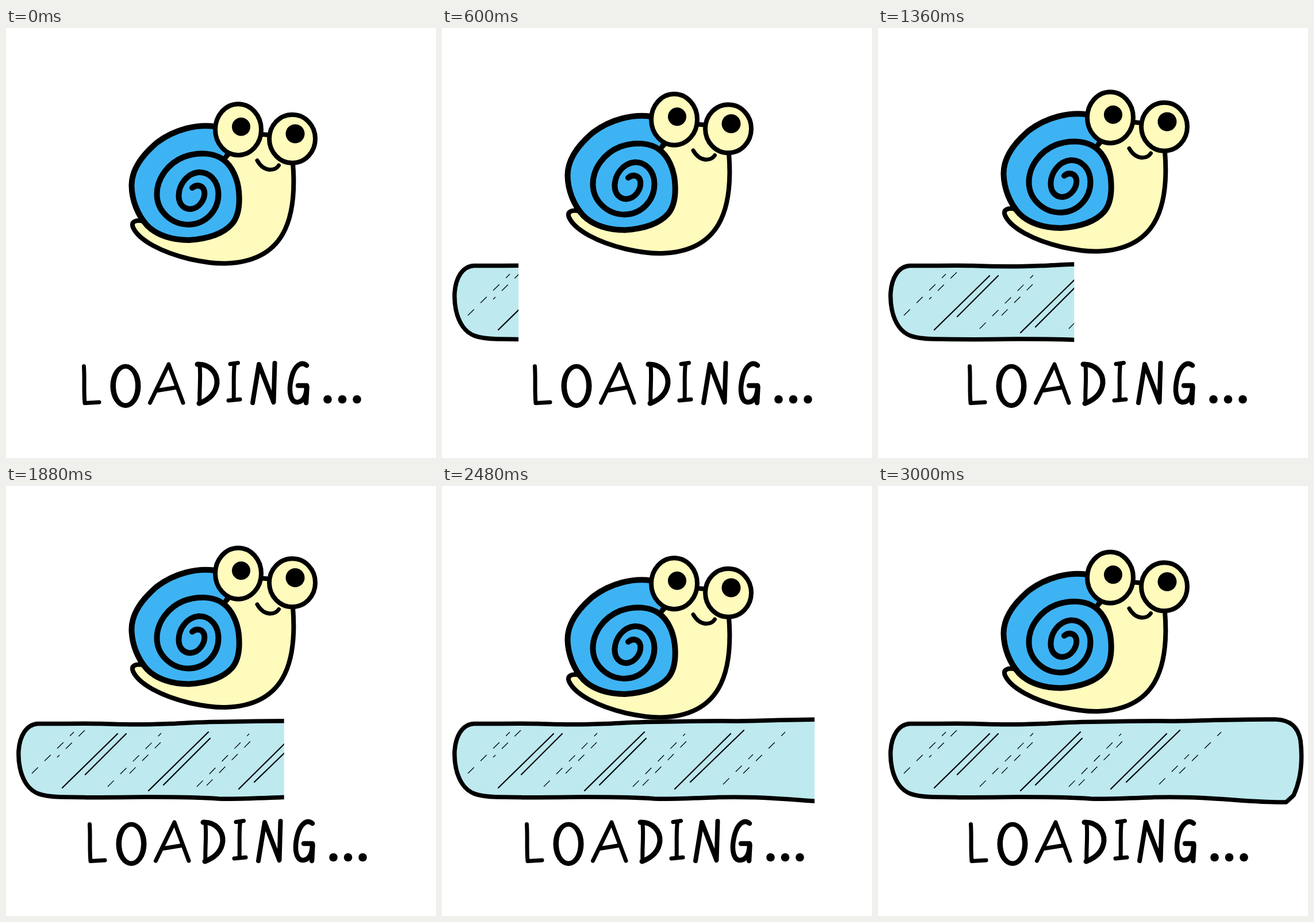
Animation, 748 px wide and 748 px high, one loop 3.04 s. Source, as an HTML page without scripts:

```html
<!DOCTYPE html>
<html lang="en">
<head>
<meta charset="utf-8">
<title>Loading</title>
<style>
  @property --n { syntax: "<number>"; inherits: true; initial-value: 0; }

  html, body { margin: 0; width: 100%; height: 100%; overflow: hidden; background: #fff; }

  svg {
    display: block; width: 100%; height: 100%;
    fill: none; stroke: #000; stroke-linecap: round; stroke-linejoin: round;
    animation: tick 3040ms steps(76) infinite;
  }
  /* --n counts 40 ms ticks */
  @keyframes tick { from { --n: 0; } to { --n: 76; } }

  /* acos(cos(x)) is a triangle wave; tan of a tiny angle makes it a plain number */
  .snail { transform: translateY(calc(tan(acos(cos(var(--n) * 18deg)) / 100) * -1113.7px)); }
  .word { transform: translateX(calc(tan(acos(cos(var(--n) * 132deg)) / 100) * 954.6px - 4px * min(1, var(--n)))); }
  .cover { transform: translateX(calc(10.957px * var(--n) - 31.3px)); fill: #fff; stroke: none; }

  .bar { fill: #bde9ef; stroke-width: 7.5; }
  .shine { stroke-width: 2.2; }
  .dash { stroke-width: 1.3; stroke-dasharray: 15 16; stroke-linecap: butt; }
  .cream { fill: #fffbbd; stroke-width: 8; }
  .blue { fill: #3eb3f3; stroke: none; }
  .shell { stroke-width: 10; }
  .ink { fill: #000; stroke: none; }
</style>
</head>
<body>
<svg viewBox="0 0 748 748" role="img" aria-label="LOADING...">
  <g>
    <path class="bar" d="M55 413.5C90 414 130 412.5 165 413.5C205 415 250 415 285 413.5C320 412 350 410 390 410C440 409 470 408.5 510 409C570 408 630 405.5 692 406C717 407 731 419 735 443C739 478 735 512 723 538L710 550C670 551 625 546 580 543.5C545 541 510 541 480 541.5C440 543 400 545 370 544C330 541 290 541 240 541C190 542 140 542 95 541C62 540 47 535 36 519C24 502 21 478 22 460C24 435 35 415 55 413.5Z"/>
    <path class="shine" d="M98 525L194 431M138 502L209 431M248 530L352 428M274 520L355 439M405 527L502 431M432 515L525 425"/>
    <path class="dash" d="M45 500L118 428M104 457L137 425M89 472L93 468M177 523L270 430M215 500L269 446M332 523L423 431M349 521L436 433M489 519L541 467M524 500L597 428"/>
  </g>
  <rect class="cover" y="390" width="800" height="175"/>

  <g class="snail">
    <path class="cream" d="M240 336C225 333 217 337 221 347C231 369 270 390 320 402C345 407.5 365 410 382 409.5C430 408 463 390 481 359C499 328 503 285 499 235L497 205L456 186L446 185L400 205L380 228Z"/>
    <path class="blue" d="M364 171.5C332 167 294 176 263 199C232 225 218 250 218.5 275C219 300 229 325 245 343C262 361 290 369 318 369C350 367 378 358 393 341C405 327 407 305 405 284C403 262 393 240 378 229L388 214Z"/>
    <path class="shell" d="M364 171.5C332 167 294 176 263 199C232 225 218 250 218.5 275C219 300 229 325 245 343C262 361 290 369 318 369C350 367 378 358 393 341C405 327 407 305 405 284C403 262 393 240 378 229C362 217 335 215 310 224C282 235 262 262 262.5 290C263 318 287 342 318 342C348 341 370 317 369.5 288C369 266 354 250 335 251C315 253 301 272 300.5 291C300 307 310 315 321 315C336 314 347 298 345 284C343 274 332 271 324 278"/>
    <path d="M380 227L386 217" stroke-width="7"/>
    <ellipse class="cream" cx="404" cy="176.7" rx="40" ry="44.5"/>
    <ellipse class="cream" cx="498" cy="192.7" rx="40" ry="42"/>
    <circle class="ink" cx="409" cy="171.7" r="16"/>
    <circle class="ink" cx="503" cy="184" r="16.5"/>
    <path d="M437 230.5C443 241 451 246 459 246.5C467 246.5 472 243 474.500 239" stroke-width="7"/>
  </g>

  <g class="word" stroke-width="7">
    <path d="M135.5 588.5C137 610 135 630 137 652.5L162 651"/>
    <path class="ink" fill-rule="evenodd" d="M208 584.5A26.5 38.2 0 0 1 208 661A26.500 38.2 0 0 1 208 584.500ZM208 592.500A17 30 0 0 0 208 652.500A17 30 0 0 0 208 592.500Z"/>
    <path d="M250.500 652L283 585L308 652M261 631L298 625"/>
    <path d="M337 587C339 610 336 630 337 652"/>
    <path d="M333 585C354 584 368 600 367 618C365 636 352 647 336 653" stroke-width="9"/>
    <path d="M390 584.500L403.500 582.500M397.500 584C395 605 397 628 396 647M387 648L407 646"/>
    <path d="M429 652L440 585L465.500 651L467.500 583" stroke-width="8"/>
    <path d="M523 587C513 579 502 588 497 607C490.500 632 495 650.500 506 651C517 650.500 523 640 523 622L508 622M523.500 624L522 652" stroke-width="8.500"/>
    <g class="ink"><circle cx="559.500" cy="646" r="7.300"/><circle cx="585" cy="646" r="7.300"/><circle cx="610.500" cy="646" r="7.300"/></g>
  </g>
</svg>
</body>
</html>
```
